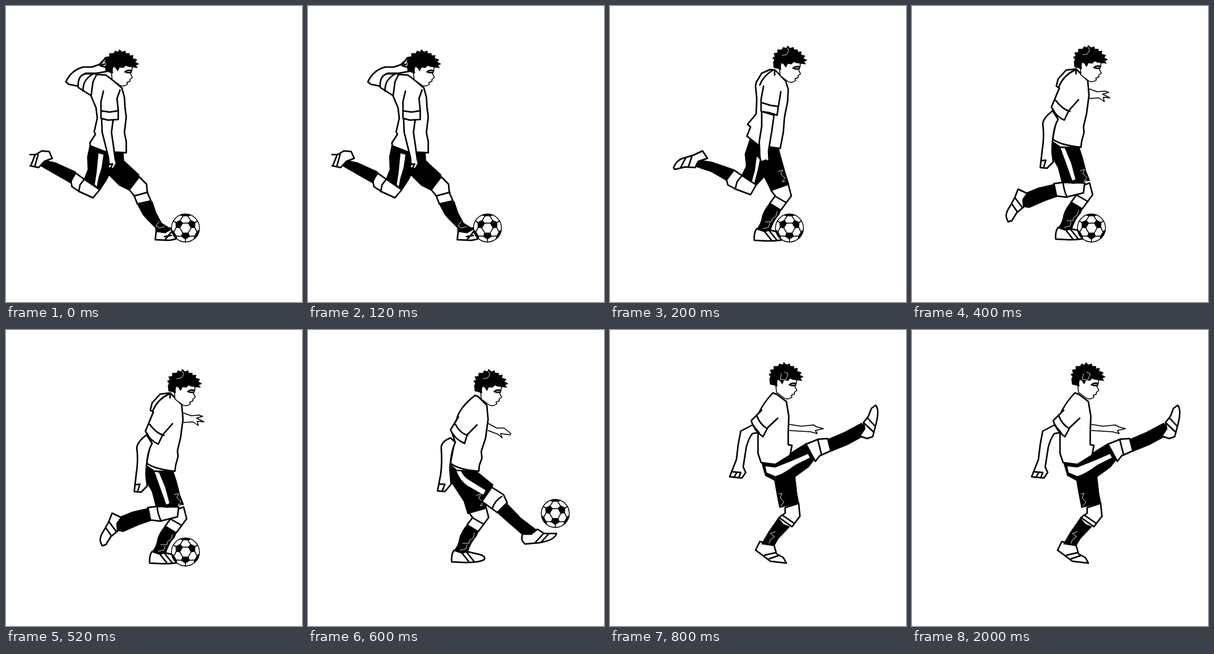
An HTML page for the animation above (2800 ms loop, 480x480 px).

```html
<!DOCTYPE html>
<html lang="en">
<head>
<meta charset="utf-8">
<title>Football kick</title>
<style>
  html, body { margin: 0; width: 100%; height: 100%; overflow: hidden; background: #fff; }
  svg { display: block; width: 100%; height: 100%; }
  path { fill: #fff; stroke: #000; stroke-width: 2.5; stroke-linejoin: round; stroke-linecap: round; }
  .k { fill: #000; stroke-width: 1.2; }
  .l { fill: none; }
  .s { fill: #fff; stroke: none; }
  .n { fill: none; stroke: #fff; stroke-width: .8; }
  .thin { stroke-width: 1.5; }
</style>
</head>
<body>
<svg viewBox="0 0 480 480">
  <defs>
    <g id="head">
      <path class="thin" d="M276 102L277 92L285 88L309 90L308 99L306 104L309 110L305 113V116L300 118L301 121Q294 126 288 122L276 113L275 102"/>
      <path class="l" d="M297 101Q301 97 307 99M300 102H306"/>
      <path class="k" d="M266 100L265 91L267 88L264 84L268 82L266 77L272 76L272 71L279 71L281 67L286 69L288 65L292 69L297 67L298 71L304 71V75L310 74L309 79L316 81L313 85L319 88L314 90L317 94L309 93L302 92L298 90L294 94L288 93L285 99L282 94L278 92L276 96L277 103L271 101Z"/>
    </g>
    <path id="hairLine" class="n" d="M288 68L290 73L286 79L279 80"/>
    <g id="ball">
      <circle r="22.7" fill="#fff" stroke="#000" stroke-width="1.4"/>
      <g id="panel">
        <path class="k" d="M-4.5 8H4.5L6.5 13.5L0 18L-6.5 13.5Z"/>
        <path class="k" d="M-8 -21L-5 -19.5H5L8 -21Q0 -24 -8 -21Z"/>
        <path class="l thin" d="M4.5 8L9 0M0 18V22M6.5 13.5L14 13M-6.5 13.5L-14 13"/>
      </g>
      <use href="#panel" transform="rotate(120)"/>
      <use href="#panel" transform="rotate(240)"/>
    </g>
    <g id="standing">
      <path d="M261 299L289 289L294 308L277 331L259 320L268 308Z"/>
      <path class="l" d="M267 308L286 319"/>
      <path d="M238 361Q233 367 234 380L255 381Q281 381 287 376Q290 370 275 367L262 364Z"/>
      <path class="l" d="M251 366L262 380M258 364L270 379"/>
      <path class="k" d="M259 320L267 326L277 331L274 338Q264 349 260 364L250 366L238 362Q246 352 247 341Q250 331 259 320Z"/>
      <path class="n" d="M271 333L269 341L263 345L262 350L252 350M259 352L257 359L248 361"/>
    </g>
    <path id="shortsLine" class="n" d="M273 268L280 266L277 273L284 279L279 285L284 284"/>
  </defs>

  <g class="pose">
    <path d="M161 84L154 94L139 99L125 99Q106 104 97 123L102 127L117 130L121 115L129 109L147 109L164 106V96Z"/>
    <path class="l" d="M160 94L153 97L161 99M157 89L151 95"/>
    <path d="M117 132Q116 112 129 110L147 110L145 125L139 146Z"/>
    <path class="l" d="M125 138Q124 120 140 111"/>
    <path class="k" d="M136 226L160 236L190 237L191 251L216 274L200 299L184 291L167 274L163 282L152 299L126 283L133 265L132 245Z"/>
    <path class="s" d="M150 239L158 241L155 262L150 278L147 293L144 289L147 270Z"/>
    <path d="M147 111L162 112L174 121L188 133L192 148L193 165L195 180L192 205L195 220V238L178 237L160 236L137 227L136 222L145 208L143 204L148 182L146 165L138 146L141 123Z"/>
    <path d="M155 183L156 205L161 225L166 245L167 256L165 262L174 264L179 255L177 248L174 225L171 205L174 183Z"/>
    <path class="l" d="M167 257L173 256L170 262"/>
    <path d="M158 138L154 155V182L165 185L182 184V169L180 150L185 136"/>
    <path class="l" d="M154 170L168 172L181 170"/>
    <path d="M105 283L113 271L127 281L152 298L141 311L119 301L107 293Z"/>
    <path class="l" d="M127 281L120 290L118 301"/>
    <path class="k" d="M57 249L80 254L113 269L105 287L82 274L56 259Z"/>
    <path d="M39 241H48L58 235L70 236L75 247L62 252L53 262L39 259"/>
    <path class="l" d="M47 242L41 257M52 241L47 259"/>
    <path d="M216 277L228 289L229 302L235 316L213 321L208 308L200 298Z"/>
    <path class="l" d="M208 308L230 302"/>
    <path d="M244 362L242 379L265 380L275 378L274 372L267 360Z"/>
    <path class="l" d="M257 374L268 372M258 379L270 364"/>
    <path class="k" d="M213 321L237 317L243 335L252 352L268 362L258 368L244 366L242 359L230 347L222 338Z"/>
    <path class="n" d="M248 350L243 357L249 360L257 358"/>
    <use href="#head" x="-104" y="6"/>
  </g>

  <g class="pose">
    <use href="#standing"/>
    <path class="k" d="M227 216L241 226L257 230H273L277 245L284 270L290 289L261 299L250 277L237 291L213 276L221 260L219 240Z"/>
    <path class="s" d="M238 244L243 249L240 264L234 287L230 285L235 267Z"/>
    <use href="#shortsLine"/>
    <path d="M268 104L260 103L246 109L237 124L236 130L238 150L237 175L223 192L228 196L222 211L241 226L276 231L281 205L283 180L288 155L289 135L285 122Z"/>
    <path class="l" d="M264 104Q248 114 243 128M267 105V112"/>
    <path d="M246 171V195L242 220L243 245L245 253L253 250L258 253L257 235L262 205L266 177Z"/>
    <path class="l" d="M244 253L250 261L257 251"/>
    <path d="M249 130L245 151V171L258 173L271 177L273 163L277 139"/>
    <path class="l" d="M247 157L260 161L273 163"/>
    <path d="M189 282L201 266L214 275L237 290L228 306L204 297L191 290Z"/>
    <path class="l" d="M214 275L206 285L203 297"/>
    <path class="k" d="M140 249L165 253L200 265L189 283L165 269L138 260Z"/>
    <path d="M103 262Q108 250 118 247L135 242L150 235L158 247L143 252L138 262L122 261L105 265Z"/>
    <path class="l" d="M123 246L115 261M133 243L127 261"/>
    <use href="#head"/>
    <use href="#hairLine"/>
  </g>

  <g class="pose">
    <path class="thin" d="M286 134L300 139L313 138L319 140L309 143L321 149L310 148L312 155L303 149L287 150"/>
    <use href="#standing" x="-1" y="-2"/>
    <path d="M230 288L245 286L280 287L278 303L250 310L234 308Z"/>
    <path class="l" d="M245 286Q246 298 251 309"/>
    <path class="k" d="M227 219L240 228L271 229L277 248L282 268L288 283L262 288L243 285L237 262L229 248Z"/>
    <path class="s" d="M241 230L248 231L258 255L265 281L260 283L251 258Z"/>
    <use href="#shortsLine" y="-1"/>
    <path d="M266 102L250 104L237 118L234 130L239 133L227 164L235 180L228 216Q242 226 274 229L275 220L279 205L278 196L283 175L287 145L285 121L270 106Z"/>
    <path class="l" d="M264 104Q246 112 238 131M266 103V110"/>
    <path d="M228 170Q213 181 212 191Q215 210 211 235L208 262L219 263L229 253L227 235Q228 198 237 184Z"/>
    <path class="l" d="M209 251L217 250L214 260"/>
    <path class="s" d="M240 133L227 164L247 185L270 153Z"/>
    <path class="l" d="M239 133L226 164Q234 180 247 185L254 170L270 152M233 153Q243 167 256 171"/>
    <path class="k" d="M231 289L205 295L183 304L179 325L190 327L215 316L235 309Z"/>
    <path d="M187 304L172 297L167 310L160 323Q151 336 153 343L156 350L162 348L170 335L181 326L180 314Z"/>
    <path class="l" d="M167 311L179 327M162 321L171 334"/>
    <use href="#head" x="-2" y="-1"/>
    <use href="#hairLine" x="-2" y="-1"/>
  </g>

  <g class="pose">
    <path class="thin" d="M291 151L306 159L318 159L329 168L328 170L312 168L315 175L308 169L292 163"/>
    <use href="#standing" x="-1" y="-4"/>
    <path class="k" d="M231 218L241 227L273 229L300 251L290 275L287 290L259 298L253 278L240 258L231 245Z"/>
    <path class="s" d="M241 229H248Q253 239 262 244L288 260L284 267L258 252Q246 243 241 229Z"/>
    <use href="#shortsLine"/>
    <path d="M298 255L317 267L323 280L307 296L282 278Z"/>
    <path class="l" d="M314 270Q303 277 299 289"/>
    <path class="k" d="M322 281L345 305L370 324L362 333L347 331L325 312L307 296Z"/>
    <path d="M348 331Q344 341 352 347L375 345Q400 341 403 330L383 330L372 323L362 331Z"/>
    <path class="l" d="M382 330L369 344M390 331L378 344"/>
    <path d="M271 106Q246 125 241 145L232 162L238 180L231 216Q245 227 277 229L278 219L282 208L281 197L288 175L292 145L290 122L276 108Z"/>
    <path d="M231 175Q216 181 216 191Q218 214 215 235L210 261L222 262L232 250L230 225Q232 196 239 182Z"/>
    <path class="l" d="M213 250L222 250L218 260"/>
    <path class="s" d="M245 142L231 162L252 185L273 154Z"/>
    <path class="l" d="M244 141L231 162Q239 178 254 184L258 170L274 154M239 153Q246 167 259 171"/>
    <use href="#head" x="5" y="-1"/>
    <use href="#hairLine" x="5" y="-1"/>
  </g>

  <g class="pose">
    <path class="thin" d="M290 153L310 156L330 154L335 157L346 160L333 163L336 168L325 165L291 163"/>
    <path d="M284 288L306 281L308 302L295 319L274 304L284 297Z"/>
    <path class="l" d="M279 300L298 313"/>
    <path d="M243 343L236 357L247 365L260 375L286 378L281 369L270 363L266 349Z"/>
    <path class="l" d="M251 365L269 361M258 371L273 366"/>
    <path class="k" d="M273 305L281 315L291 319L273 338L266 350L246 347L257 328Z"/>
    <path class="n" d="M268 327L260 330L267 335L260 340L258 346"/>
    <path class="k" d="M246 215L268 217L300 195L318 184L333 208L322 222L300 238L303 265L306 280L275 288L270 262L267 244L252 236Z"/>
    <path class="s" d="M252 221L268 223L298 211L321 201L324 207L300 219Q280 234 268 237L254 231Z"/>
    <path class="n" d="M274 266L279 265L276 272L282 279L277 286"/>
    <path d="M318 185L338 177L353 176L358 196L340 204L333 213Z"/>
    <path class="l" d="M337 178L343 202"/>
    <path class="k" d="M354 177L380 166L408 151L414 160L409 173L385 186L358 197Z"/>
    <path d="M411 150L419 140L424 127L431 122Q437 130 432 150L426 173L417 176L405 172L413 160Z"/>
    <path class="l" d="M417 142L430 156M412 151L428 166"/>
    <path d="M264 102Q247 120 240 138L230 150L240 168V200L245 215L268 218L292 203L295 187L289 186V165L290 140L286 116L270 104Z"/>
    <path d="M231 154L212 164L208 185L205 210L194 238L214 240L220 231L216 222L221 190Q225 175 231 168L242 166Z"/>
    <path class="l" d="M199 230L212 231L209 239M205 232L201 239"/>
    <path class="s" d="M246 130L229 148L249 174L272 144Z"/>
    <path class="l" d="M246 130L229 147Q234 164 248 173L256 158L272 143M238 139Q243 153 255 160"/>
    <use href="#head" x="-6" y="-12"/>
    <path class="n" d="M278 71L276 80L285 81L289 71L283 68"/>
  </g>

  <use id="kicked" href="#ball"/>
</svg>
<script>
  const STEP = 200, LOOP = 2800;
  const poses = [...document.querySelectorAll('.pose')];
  const ball = document.getElementById('kicked');
  const start = performance.now();

  function draw(time) {
    const step = Math.min(Math.floor(time / STEP), poses.length - 1);
    poses.forEach((pose, i) => pose.style.display = i === step ? '' : 'none');
    const [x, y] = step < 3 ? [291, 360] : [401, 297.5];
    ball.setAttribute('transform', `translate(${x} ${y})`);
    ball.style.display = step < 4 ? '' : 'none';
  }

  function tick() {
    draw((performance.now() - start) % LOOP);
    requestAnimationFrame(tick);
  }
  tick();
</script>
</body>
</html>
```
